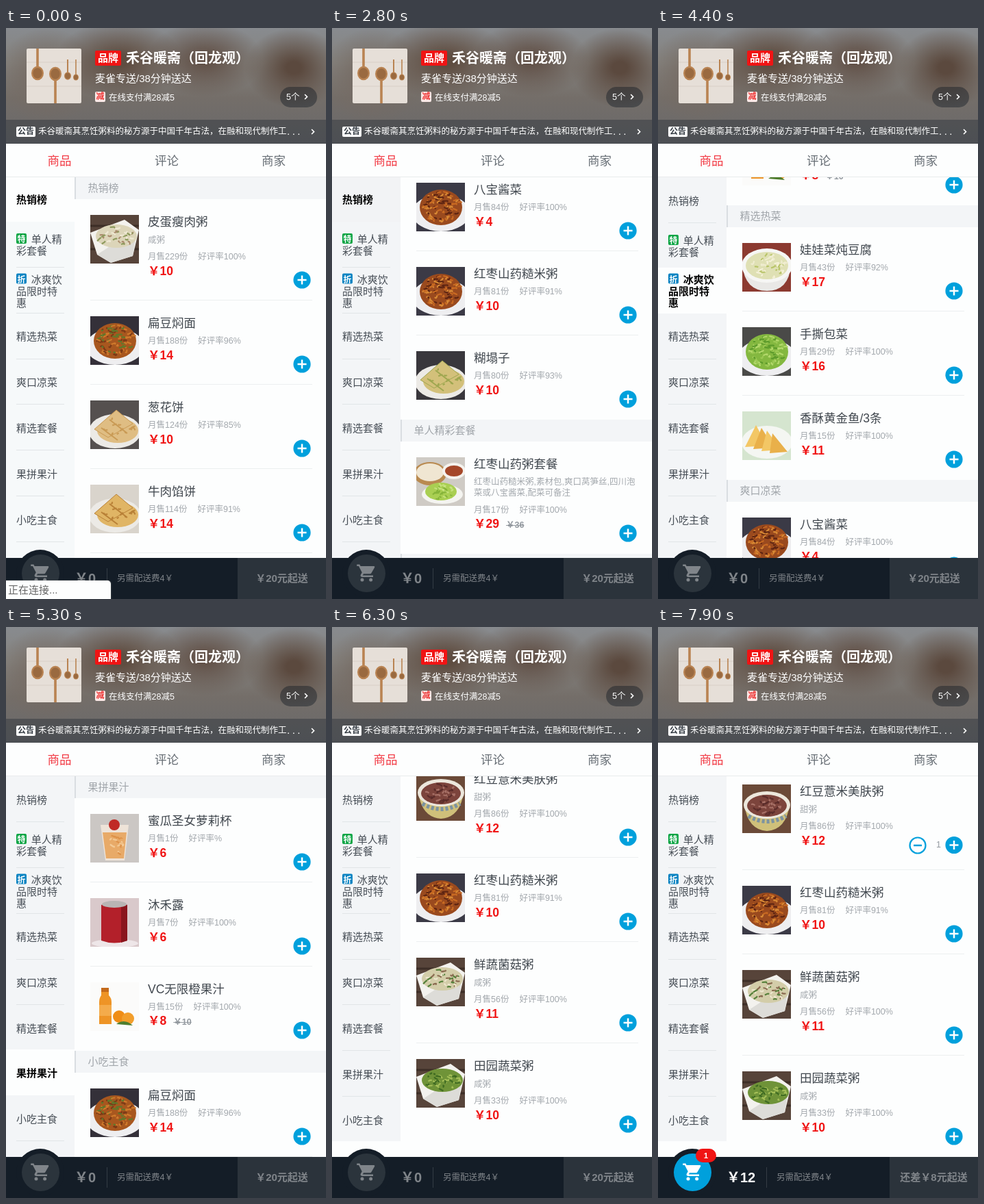
Write an HTML page that moves like this. It is 467 px wide and 834 px high and loops after 8000 ms.

```html
<!DOCTYPE html>
<html lang="zh-CN">
<head>
<meta charset="utf-8">
<title>点餐</title>
<style>
html, body { margin: 0; width: 100%; height: 100%; overflow: hidden; }
#stage { position: relative; width: 467px; height: 834px; overflow: hidden; background: #fdfefe;
  font: 300 12.5px/18px "Liberation Sans", "Noto Sans CJK SC", "Noto Sans CJK", sans-serif; white-space: nowrap; }
#stage div, #stage svg { position: absolute; }
.mid { transform: translateY(-50%); }

#head { width: 467px; height: 169px; color: #fff; overflow: hidden; font-weight: 400; background:
  radial-gradient(ellipse 95px 58px at 165px 48px, #5f4d41 15%, transparent),
  radial-gradient(ellipse 85px 55px at 290px 46px, #63534a 15%, transparent),
  radial-gradient(ellipse 72px 58px at 420px 58px, #5b493e 15%, transparent),
  radial-gradient(ellipse 75px 70px at 60px 70px, #756a62 20%, transparent),
  linear-gradient(#888b8f, #85837f 30%, #746e69 60%, #68686a); }
#head .tag { border-radius: 2px; text-align: center; font-weight: 700; }
#notice { top: 134px; width: 467px; height: 35px; background: rgba(7,17,27,.28); }
#tabs { top: 169px; width: 467px; height: 48px; border-bottom: 1px solid #e9ebec; font-size: 17.5px; color: #666d74; }
#tabs div { top: 25px; transform: translate(-50%, -50%); }

#side { top: 218px; width: 100px; height: 556px; overflow: hidden; }
.cell { left: 0; width: 100px; height: 66.9px; }
.cell p { position: absolute; left: 15px; top: 50.5%; width: 70px; margin: 0; transform: translateY(-50%);
  font-size: 15px; line-height: 17px; white-space: normal; color: #474e56; }
.cell::after { content: ""; position: absolute; left: 15px; width: 70px; bottom: 0; height: 1px; background: #e1e5e7; }
.cell.on p { font-weight: 700; color: #000; }
.cell.on::after { display: none; }
.cell i { display: inline-block; width: 15px; height: 15px; margin-right: 2.5px; border-radius: 2px; vertical-align: top;
  font: 700 12px/15px "Noto Sans CJK SC", "Noto Sans CJK", sans-serif; color: #fff; text-align: center; }

#list { left: 100px; top: 218px; width: 367px; height: 556px; overflow: hidden; }
.group { left: 0; width: 364.5px; height: 32px; border-left: 2.5px solid #d9dde1; background: #f3f5f7;
  font-size: 15px; line-height: 32px; color: #a0a5aa; text-indent: 17.5px; }
.item { left: 23px; width: 324px; }
.item.line::after { content: ""; position: absolute; top: -24px; width: 324px; height: 1px; background: #eceff0; }
.name { left: 84px; font-size: 17.5px; color: #40474e; }
.grey { left: 84px; line-height: 16px; color: #a3a8ad; }
.price { left: 84px; font-size: 17.5px; font-weight: 700; color: #f01414; }
.price s { margin-left: 10px; font-size: 12.5px; color: #93999f; }

#foot { top: 774px; width: 467px; height: 60px; background: #141d27; color: #80858a; }
#cart { left: 15px; top: -12.5px; width: 70px; height: 70px; border-radius: 50%; background: #141d27; }
#cup { left: 7.5px; top: 7.5px; width: 55px; height: 55px; border-radius: 50%; background: #2b343c; color: #80858a; }
#badge { left: 55px; top: -12px; width: 30px; height: 20px; border-radius: 10px; background: #f01414; color: #fff;
  font: 700 11.5px/20px "Liberation Sans", sans-serif; text-align: center; }
#pay { left: 338px; width: 129px; height: 60px; background: #2b333b; font: 700 15px/60px "Liberation Sans", "Noto Sans CJK SC", "Noto Sans CJK", sans-serif; text-align: center; }
#total { left: 100px; top: 30px; font-size: 20px; font-weight: 700; }
#fee { top: 30px; }
#bar { top: 15px; width: 1px; height: 30px; background: #343c45; }
#ball { width: 20px; height: 20px; margin: -10px; border-radius: 50%; background: #00a0dc; }
#status { left: 0; top: 807px; width: 153px; height: 27px; border-radius: 0 5px 0 0; background: #fdfefe; color: #666;
  font-size: 15px; line-height: 27px; text-indent: 3px; box-shadow: 0 0 2px #777; }
</style>
</head>
<body>
<div id="stage">
  <div id="head">
    <svg id="avatar" style="left:30px;top:30px;border-radius:2px" width="80" height="80"></svg>
    <div class="tag" style="left:130px;top:33px;width:38px;height:22px;background:#f01414;font-size:15px;line-height:22px">品牌</div>
    <div class="mid" style="left:175px;top:44px;font-size:20px;font-weight:700">禾谷暖斋（回龙观）</div>
    <div class="mid" style="left:130px;top:74px;font-size:15px">麦雀专送/38分钟送达</div>
    <div class="tag" style="left:130px;top:93px;width:15px;height:15px;background:#fbe9e7;color:#e33;font-size:12px;line-height:15px">减</div>
    <div class="mid" style="left:150px;top:102px">在线支付满28减5</div>
    <div style="left:400px;top:86px;width:54px;height:30px;border-radius:15px;background:rgba(7,17,27,.38);line-height:30px;text-indent:9px">5个</div>
    <div id="notice">
      <div class="tag" style="left:15px;top:10px;width:28px;height:15px;background:#fff;color:#333a42;font-size:12px;line-height:15px">公告</div>
      <div class="mid" style="left:47px;top:17px">禾谷暖斋其烹饪粥料的秘方源于中国千年古法，在融和现代制作工</div>
      <div class="mid" style="left:410px;top:17px;font-size:15px;letter-spacing:3.5px">...</div>
    </div>
    <svg width="467" height="169" fill="none" stroke="#fff" stroke-width="1.6"><path d="M436 97l3.5 3.5-3.5 3.5M446 148l3.5 3.5-3.5 3.5"/></svg>
  </div>
  <div id="tabs">
    <div style="left:78px;color:#f23a44">商品</div><div style="left:234.5px">评论</div><div style="left:390.5px">商家</div>
  </div>
  <div id="side"></div>
  <div id="list"><div id="scroll"></div></div>
  <div id="foot">
    <div id="cart"><div id="cup"><svg style="left:12px;top:12px" width="30" height="30" viewBox="0 0 24 24" fill="currentColor">
      <path d="M1 2h3.3l1 2H21q1.3 .2 .7 1.5L18 12q-.5 1-1.7 1H8.8l-.9 1.7H20v2H7.2Q4.4 16.3 5.6 13.7L7 11.3 3.2 4H1z"/><circle cx="7.2" cy="20" r="2"/><circle cx="17.3" cy="20" r="2"/></svg></div></div>
    <div id="badge">1</div>
    <div id="total" class="mid"></div><div id="bar"></div>
    <div id="fee" class="mid">另需配送费4￥</div>
    <div id="pay"></div>
  </div>
  <div id="ball"></div>
  <div id="status">正在连接...</div>
</div>
<script>
const $ = id => document.getElementById(id);
const BLUE = '#00a0dc';

// name: sold|rating|price|description|old price
const dishes = {
  皮蛋瘦肉粥: '229|100|10|咸粥', 扁豆焖面: '188|96|14', 葱花饼: '124|85|10', 牛肉馅饼: '114|91|14',
  '招牌猪肉白菜锅贴/10个': '101|93|17', 南瓜粥: '91|100|9|甜粥', 红豆薏米美肤粥: '86|100|12|甜粥',
  八宝酱菜: '84|100|4', 红枣山药糙米粥: '81|91|10', 糊塌子: '80|93|10',
  红枣山药粥套餐: '17|100|29|红枣山药糙米粥,素材包,爽口莴笋丝,四川泡<br>菜或八宝酱菜,配菜可备注|36',
  VC无限橙果汁: '15|100|8||10', 娃娃菜炖豆腐: '43|92|17', 手撕包菜: '29|100|16', '香酥黄金鱼/3条': '15|100|11',
  拍黄瓜: '32|100|9', 蜜瓜圣女萝莉杯: '1||6', 沐禾露: '7|100|6', 鲜蔬菌菇粥: '56|100|11|咸粥', 田园蔬菜粥: '33|100|10|咸粥'
};
const menu = [
  ['热销榜', '皮蛋瘦肉粥 扁豆焖面 葱花饼 牛肉馅饼 招牌猪肉白菜锅贴/10个 南瓜粥 红豆薏米美肤粥 八宝酱菜 红枣山药糙米粥 糊塌子'],
  ['单人精彩套餐', '红枣山药粥套餐', '特', '#0aa544'],
  ['冰爽饮品限时特惠', 'VC无限橙果汁', '折', '#0a84c2'],
  ['精选热菜', '娃娃菜炖豆腐 手撕包菜 香酥黄金鱼/3条'],
  ['爽口凉菜', '八宝酱菜 拍黄瓜'],
  ['精选套餐', '红枣山药粥套餐'],
  ['果拼果汁', '蜜瓜圣女萝莉杯 沐禾露 VC无限橙果汁'],
  ['小吃主食', '扁豆焖面 葱花饼 牛肉馅饼 招牌猪肉白菜锅贴/10个 糊塌子'],
  ['特色粥品', '皮蛋瘦肉粥 南瓜粥 红豆薏米美肤粥 红枣山药糙米粥 鲜蔬菌菇粥 田园蔬菜粥']
];

// vessel, backdrop, food, garnish colours
const looks = {
  皮蛋瘦肉粥: 'bowl #57443a #dcd5b9 #8d9a5c #f0ead6 #a98b6c', 扁豆焖面: 'plate #343039 #a8571f #d07a2c #5f7a2b #7b3a17',
  葱花饼: 'cake #55504f #dfbd83 #c99a55', 牛肉馅饼: 'cake #d9d4cc #e0b565 #b98137',
  '招牌猪肉白菜锅贴/10个': 'cake #4b3a33 #d9a95e #a8682c', 南瓜粥: 'bowl #57443a #e0a53a #f0c264',
  红豆薏米美肤粥: 'round #6b4a38 #7c443c #a87268 #5a2c2a', 八宝酱菜: 'plate #3b3a46 #9a4a1e #c96a22 #5d2412 #d98a35',
  红枣山药糙米粥: 'plate #3b3a46 #9a4a1e #c96a22 #5d2412 #d98a35', 糊塌子: 'cake #39373c #d3c07a #9fa750',
  红枣山药粥套餐: 'set #cfcbc5', VC无限橙果汁: 'bottle #fbfbfa', 娃娃菜炖豆腐: 'basin #8c3a30 #dfe0b4 #f5f1d8 #b8c468 #efeccf',
  手撕包菜: 'plate #4a4a48 #84b840 #b4d96c #5c9a2b #9cc954', '香酥黄金鱼/3条': 'wedge #d5e5cf',
  拍黄瓜: 'plate #5a5a58 #88b04b #c3d98c', 蜜瓜圣女萝莉杯: 'glass #cbc7c4', 沐禾露: 'can #d9c9cb',
  鲜蔬菌菇粥: 'bowl #57443a #d3cda9 #55803a #8a6a50 #eee7cf', 田园蔬菜粥: 'bowl #57443a #6f9338 #a4bf58 #3f6b22'
};

function random(seed) {
  return () => (seed = (seed * 16807) % 2147483647) / 2147483647;
}
const path = (d, fill, more = '') => `<path d="${d}" fill="${fill}" ${more}/>`;
const oval = (x, y, rx, ry, fill) => `<ellipse cx="${x}" cy="${y}" rx="${rx}" ry="${ry}" fill="${fill}"/>`;

function scatter(colors, x, y, rx, ry, count) {
  const rnd = random(colors.join('').length * 97 + count);
  const bend = size => ((rnd() - .5) * size).toFixed(1);
  let out = '';
  for (let i = 0; i < count; i++) {
    const a = rnd() * 6.28, r = Math.sqrt(rnd()), px = x + rx * r * Math.cos(a), py = y + ry * r * Math.sin(a);
    out += path(`M${px.toFixed(1)} ${py.toFixed(1)}q3 ${bend(8)} ${bend(14)} ${bend(8)}`, 'none', `stroke="${colors[i % colors.length]}" stroke-width="2.2"`);
  }
  return out;
}

const vessels = {
  bowl: (food, extra) => path('M0 16H71M0 50H71', 'none', 'stroke="#3d2e27" stroke-width="3"') + path('M0 26L50 7 71 22 62 60 30 70 10 58Z', '#f3f2ee')
    + path('M10 58L27 47 66 34 62 60 30 70Z', '#dddcd8') + oval(38, 31, 30, 17, food) + scatter(extra, 38, 31, 25, 13, 32),
  plate: (food, extra) => oval(36, 44, 42, 27, '#eeeef0') + oval(36, 36, 31, 26, food) + scatter(extra, 35, 36, 27, 22, 80),
  basin: (food, extra) => path('M0 32Q4 70 36 70 68 70 71 32Z', '#e9e8e6') + oval(36, 33, 37, 25, '#f6f6f4') + oval(36, 33, 31, 20, food) + scatter(extra, 36, 33, 26, 16, 40),
  round: (food, extra) => path('M3 30Q8 66 36 68 64 66 69 30Z', '#cfc07a') + path('M9 46Q36 62 64 46', 'none', 'stroke="#7c93a0" stroke-width="6" stroke-dasharray="4 3"')
    + oval(36, 30, 34, 20, '#ece7dc') + oval(36, 31, 29, 16, food) + scatter(extra, 36, 31, 24, 12, 30),
  cake: (food, extra) => oval(36, 45, 38, 25, '#eceae6') + oval(40, 44, 30, 18, food) + path('M6 42L38 14 62 34 26 54Z', food, `stroke="${extra[0]}"`)
    + path('M16 40L40 58M28 28L54 48', 'none', `stroke="${extra[0]}" stroke-width="2"`) + scatter(extra, 37, 40, 24, 13, 12),
  set: () => oval(20, 24, 24, 17, '#b98a50') + oval(20, 22, 20, 13, '#f0e6d2') + oval(55, 20, 17, 12, '#f5f3ee') + oval(55, 20, 13, 8, '#a5482a')
    + oval(38, 54, 30, 14, '#f4f4f0') + oval(36, 50, 23, 13, '#a9cf52') + scatter(['#c6e27e', '#86b43a'], 36, 50, 18, 9, 26),
  wedge: () => oval(36, 45, 37, 24, '#f4f6f2') + [0, 1, 2, 3].map(i => path(`M${4 + i * 12} ${52 + i * 3}L${20 + i * 8} ${20 + i * 4} ${36 + i * 10} ${50 + i * 3}Z`, i % 2 ? '#e9b04a' : '#f3c765')).join(''),
  glass: () => path('M15 16H56L50 68H22Z', '#eee3d8') + path('M18 27H53L49 65H23Z', '#e8aa68') + scatter(['#f3c995', '#dd9148'], 36, 46, 12, 16, 16) + oval(35, 16, 8, 8, '#c02a25'),
  can: () => oval(36, 66, 34, 6, '#eee6e8') + path('M16 10Q35 2 54 10V62Q35 69 16 62Z', '#b3202a') + path('M45 7L54 10V62L45 65Z', '#8a151d') + oval(35, 9, 18, 5, '#b9b5b4'),
  bottle: () => path('M16 10H27V19Q31 23 31 29V61H13V29Q13 23 16 19Z', '#ee9426') + path('M16 8H27V14H16Z', '#c46a1b') + path('M13 33H31V49H13Z', '#f4ab4b')
    + oval(42, 50, 9, 9, '#ef8d16') + oval(55, 53, 9, 9, '#f29e2b') + path('M38 61Q50 52 62 63Z', '#4e7d2d')
};

function picture(name) {
  const [vessel, back, food, ...extra] = looks[name].split(' ');
  return `<svg width="71" height="71"><rect width="71" height="71" fill="${back}"/>${vessels[vessel](food, extra)}</svg>`;
}

const button = (x, y, mark, attrs = '', [fill, line, edge] = [BLUE, '#fff', BLUE]) =>
  `<svg ${attrs} style="left:${x - 13}px;top:${y - 13}px" width="26" height="26"><circle cx="13" cy="13" r="11.5" fill="${fill}" stroke="${edge}" stroke-width="2.2"/><path d="${mark}" stroke="${line}" stroke-width="2.5"/></svg>`;
const row = (cls, top, body) => `<div class="${cls} mid" style="top:${top}px">${body}</div>`;

const tops = [];
function buildList() {
  let y = 0, html = '';
  for (const [group, names] of menu) {
    tops.push(y);
    html += `<div class="group" style="top:${y}px">${group}</div>`;
    y += 32;
    names.split(' ').forEach((name, i) => {
      const [sold, rate, price, text = '', old] = dishes[name].split('|');
      const extra = !text ? 0 : text.includes('<br>') ? 41 : 25;
      const chosen = group === '特色粥品' && name === '红豆薏米美肤粥';
      html += `<div class="item ${i ? 'line' : ''}" style="top:${y + 23}px">${picture(name)}`
        + row('name', 10, name)
        + (text && row('grey', extra > 25 ? 43.5 : 36.5, text))
        + row('grey', 35.5 + extra, `月售${sold}份<span style="margin-left:15px">好评率${rate}%</span>`)
        + row('price', 56.5 + extra, `￥${price}${old ? `<s>￥${old}</s>` : ''}`)
        + button(308.5, 70 + extra, 'M6.5 13h13M13 6.5v13', chosen ? 'id="plus"' : '')
        + (chosen ? button(256, 88.5, 'M7 13h12', 'id="minus"', ['#fff', BLUE, BLUE]) + '<div id="count" class="mid" style="left:283px;top:88px;color:#93999f">1</div>' : '')
        + '</div>';
      y += 123 + extra;
    });
  }
  $('scroll').innerHTML = html;
  return y - 556;
}
const end = buildList();

$('side').innerHTML = menu.map(([name, , mark, color]) =>
  `<div class="cell"><p>${mark ? `<i style="background:${color}">${mark}</i> ` : ''}${name}</p></div>`).join('');
const cells = [...document.querySelectorAll('.cell')];

const spoon = (x, y, r, length) => path(`M${x} ${y}v${length}`, 'none', `stroke="#b98352" stroke-width="${r * .4}"`)
  + oval(x, y, r, r * 1.15, '#b98352') + oval(x, y, r * .75, r * .85, '#9a6a40');
$('avatar').innerHTML = '<rect width="80" height="80" fill="#e6dfd8"/><path d="M0 20H80M0 55H80" stroke="#d8cfc6"/>'
  + spoon(16, 36, 9, -36) + spoon(42, 37, 9, 43) + spoon(60, 40, 5, -24) + spoon(72, 42, 4, -26);

const clamp = v => Math.min(1, Math.max(0, v));
// menu taps: start time and group reached
const taps = [[2730, 1], [3470, 2], [4330, 3], [4960, 6]];
// flick that overshoots the end and settles back: time, distance from the end
const flick = [[5650, tops[6] - end], [5700, -1320], [5800, -1000], [5900, -600], [6000, -270], [6100, -100],
  [6200, -19], [6300, 18], [6400, 35], [6500, 18], [6600, 7], [6700, 3], [6900, 0], [8000, 0]];

function scrollAt(t) {
  if (t >= flick[0][0]) {
    const i = flick.findIndex(p => t < p[0]);
    const [t0, a] = flick[i - 1], [t1, b] = flick[i];
    return end + a + (b - a) * (t - t0) / (t1 - t0);
  }
  return taps.reduce((y, [start, group]) => y + (tops[group] - y) * (1 - (1 - clamp((t - start) / 300)) ** 5), 0);
}

function draw(t) {
  const y = Math.round(scrollAt(t)), bought = t >= 7300;
  $('scroll').style.top = -y + 'px';

  const current = tops.filter(top => top <= y).length - 1;
  $('side').style.background = t < 2800 ? '#f6f9fa' : '#f3f5f7';
  cells.forEach((cell, i) => {
    cell.className = i === current ? 'cell on' : 'cell';
    cell.style.top = i * 66.9 - (i >= current ? 2 : 0) + 'px';
    cell.style.background = i !== current ? '' : t >= 400 && !current ? '#f2f3f5' : '#fdfefe';
  });

  const roll = clamp((t - 7250) / 400);
  $('minus').style.opacity = roll;
  $('minus').style.transform = `translateX(${30 * (1 - roll)}px) rotate(${180 * (1 - roll)}deg)`;
  $('plus').style.transform = bought ? 'translateY(-6.5px)' : '';
  $('count').style.opacity = $('badge').style.opacity = +bought;
  $('cup').style.background = bought ? BLUE : '';
  $('cup').style.color = $('total').style.color = bought ? '#fff' : '';
  $('total').textContent = bought ? '￥12' : '￥0';
  $('pay').textContent = bought ? '还差￥8元起送' : '￥20元起送';
  $('bar').style.left = (bought ? 157.5 : 146.5) + 'px';
  $('fee').style.left = (bought ? 173 : 162) + 'px';

  const drop = (t - 7300) / 400;
  $('ball').style.display = drop > 0 && drop < 1 ? '' : 'none';
  $('ball').style.left = 431 - 381 * drop + 'px';
  $('ball').style.top = 319 + 477 * Math.max(0, drop) ** 2.5 + 'px';
  $('status').style.opacity = clamp((700 - t) / 400);
}

const start = performance.now();
function tick() {
  draw(Math.floor((performance.now() - start) % 8000 / 100) * 100);
  requestAnimationFrame(tick);
}
tick();
</script>
</body>
</html>
```
